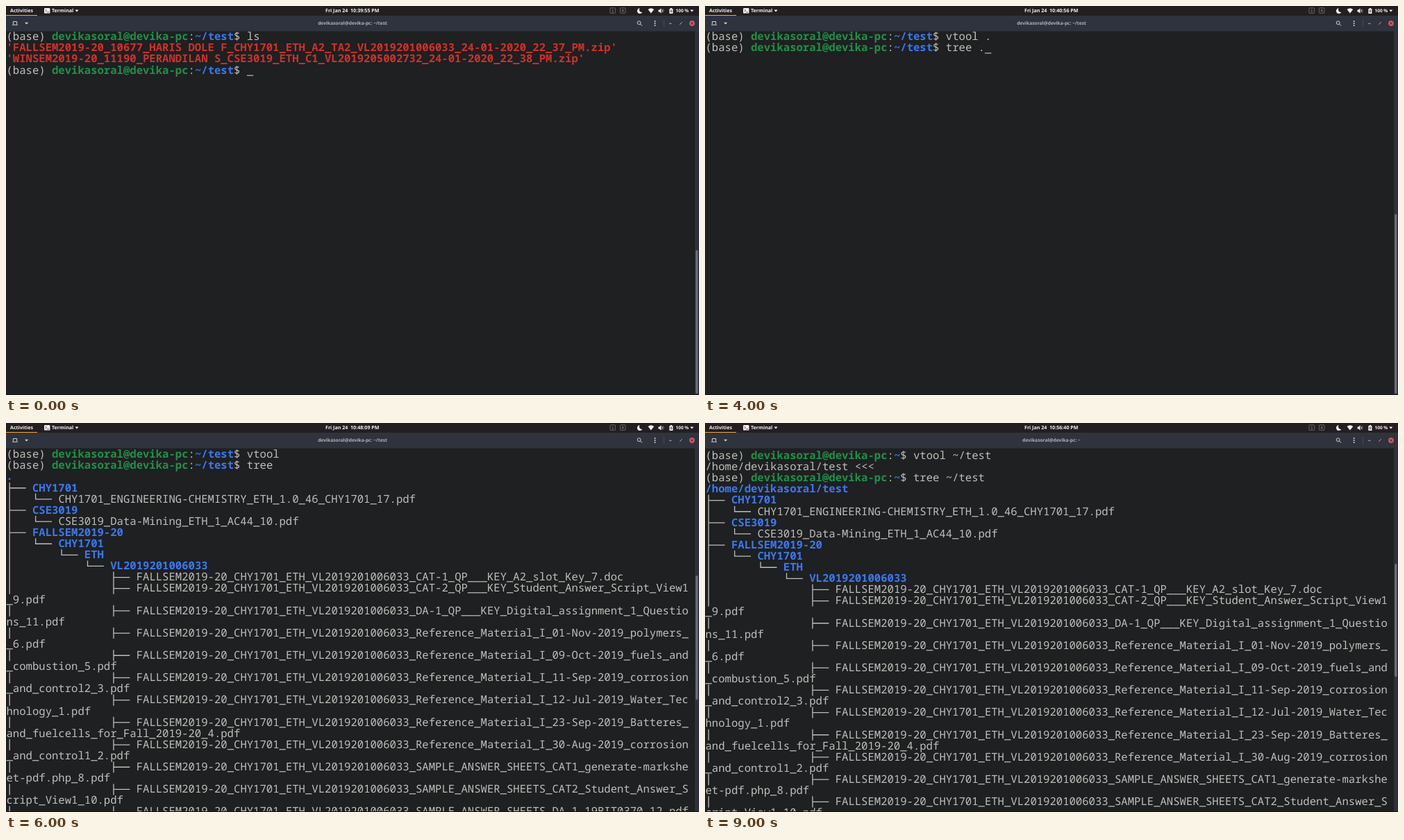
These frames come from a looping animation (998 by 561 pixels, 10000 ms). An HTML page:

```html
<!DOCTYPE html>
<html lang="en">
<head>
<meta charset="utf-8">
<title>Terminal session</title>
<style>
  html, body { margin: 0; width: 100%; height: 100%; overflow: hidden; background: #1e2021; }
  svg { display: block; width: 100%; height: 100%; }
  text { white-space: pre; text-rendering: geometricPrecision; }
  #screen text { font: 15.6px "Noto Sans Mono", "DejaVu Sans Mono", monospace; fill: #bfbfbc; }
  #screen .g { fill: #21904a; font-weight: 700; }
  #screen .b { fill: #3b78f0; font-weight: 700; }
  #screen .r { fill: #d0312b; font-weight: 700; }
  #screen path { fill: none; stroke: #bfbfbc; stroke-width: 1.3; }
  #screen rect { fill: #bfbfbc; }
  .bar { font: 700 7.1px "Noto Sans", "Open Sans", sans-serif; fill: #f2f2f2; }
  #title { font-size: 6.7px; fill: #aeb2ba; text-anchor: middle; }
  .line { fill: none; stroke: #d3d6db; stroke-width: 1; }
  .dim { fill: none; stroke: #77757a; stroke-width: .8; }
</style>
</head>
<body>
<svg viewBox="0 0 998 561">
  <defs><clipPath id="view"><rect y="36" width="992" height="524.5"/></clipPath></defs>
  <rect width="998" height="561" fill="#1e2021"/>
  <g id="screen" clip-path="url(#view)"></g>

  <rect x="992" y="36" width="6" height="525" fill="#2d313b"/>
  <rect id="thumb" x="993.2" width="3.2" rx="1.6" fill="#6a7080"/>
  <rect y="560" width="998" height="1" fill="#15161a"/>

  <rect width="998" height="14" fill="#231f20"/>
  <rect y="13" width="45" height="1.2" fill="#f0a630"/>
  <g class="bar">
    <text x="6" y="9.4">Activities</text>
    <text x="66" y="9.4">Terminal</text>
    <text id="clock" x="460" y="9.4"></text>
    <text x="964.5" y="9.3" font-size="6.5" style="font-size:6.5px">100 %</text>
    <rect x="55" y="3" width="8.4" height="7.6" rx="1.2"/>
    <path d="M99.5 5.6h5l-2.5 3zM985.3 5.6h5l-2.5 3z"/>
    <path d="M912.6 3a4 4 0 1 0 3.8 6a3.8 3.8 0 0 1-3.8-6z"/>
    <path d="M924.6 5q4.3-3.4 8.6 0l-4.3 5.6z"/>
    <path d="M939.5 5.4h1.6l2.4-2.2v7.4l-2.4-2.2h-1.6z"/>
    <path d="M955.4 4h1.4v-1h2.2v1h1.4v7h-5z"/>
  </g>
  <path d="M56.8 5l1.6 1.6l-1.6 1.6M59.3 8.8h2.4" fill="none" stroke="#231f20" stroke-width=".9"/>
  <path d="M958.4 5l-1.3 2.4h1.7l-1.3 2.4" fill="none" stroke="#231f20" stroke-width=".8"/>
  <path d="M944.8 5q1.5 1.9 0 3.8" class="line" stroke-width=".8"/>
  <path d="M946.2 4q2.2 2.9 0 5.8" class="dim"/>
  <rect x="870" y="2.8" width="7.6" height="7.6" rx="1" class="dim"/>
  <rect x="884.4" y="2.8" width="7.6" height="7.6" rx="1" class="dim"/>
  <path d="M873 5.4l.9-.6v3.6M872.8 8.4h2.2M886.7 8.6l1.5-4l1.5 4M887.2 7.3h2" class="dim"/>

  <rect y="14" width="998" height="22.5" fill="#2f333e"/>
  <text id="title" class="bar" x="499" y="27.2"></text>
  <path d="M10.4 26.4v-3.9h5.2v3.9M9 27.2h8" class="line"/>
  <path d="M27 23.8h5.2l-2.6 2.8z" fill="#d3d6db"/>
  <circle cx="911.7" cy="24.2" r="2.4" class="line"/>
  <path d="M913.5 26l2.6 2.6" class="line" stroke-width="1.3"/>
  <g fill="#d3d6db">
    <circle cx="934.6" cy="22" r="1"/><circle cx="934.6" cy="25" r="1"/><circle cx="934.6" cy="28" r="1"/>
  </g>
  <path d="M947.5 20v10" stroke="#464b57"/>
  <path d="M955 25.3h3.6M970.3 26.8l3.4-3.6" class="line" style="stroke:#a9adb5"/>
  <circle cx="988" cy="25" r="3.9" fill="#cc575d"/>
  <path d="M986.5 23.5l3 3m0-3l-3 3" stroke="#2f333e" stroke-width=".9"/>
</svg>
<script>
const COLS = 105, CELL = 9.36, ROW = 16.1, LEFT = 0.5, TOP = 36.4;
const USER = "devikasoral", HOST = USER + "@devika-pc", HOME = "/home/" + USER;
const $ = id => document.getElementById(id);

function el(parent, tag, attrs, text) {
  const node = document.createElementNS("http://www.w3.org/2000/svg", tag);
  for (const k in attrs) node.setAttribute(k, attrs[k]);
  if (text) node.textContent = text;
  parent.append(node);
  return node;
}

// A line is a list of [style, text] runs.
const plain = s => [["", s]];
const prompt = (dir, cmd = "") =>
  [["", "(base) "], ["g", HOST], ["", ":"], ["b", dir], ["", "$ " + cmd]];
const inTest = cmd => prompt("~/test", cmd);
const atHome = cmd => prompt("~", cmd);

const COURSE = "FALLSEM2019-20_CHY1701_ETH_VL2019201006033_";
const REF = "Reference_Material_I_", SHEETS = "SAMPLE_ANSWER_SHEETS_", KEY = "_QP___KEY_";
const files = {
  water: REF + "12-Jul-2019_Water_Technology_1.pdf",
  rust1: REF + "30-Aug-2019_corrosion_and_control1_2.pdf",
  rust2: REF + "11-Sep-2019_corrosion_and_control2_3.pdf",
  cells: REF + "23-Sep-2019_Batteres_and_fuelcells_for_Fall_2019-20_4.pdf",
  fuels: REF + "09-Oct-2019_fuels_and_combustion_5.pdf",
  poly: REF + "01-Nov-2019_polymers__6.pdf",
  cat1: "CAT-1" + KEY + "A2_slot_Key_7.doc",
  marks1: SHEETS + "CAT1_generate-marksheet-pdf.php_8.pdf",
  cat2: "CAT-2" + KEY + "Student_Answer_Script_View1_9.pdf",
  marks2: SHEETS + "CAT2_Student_Answer_Script_View1_10.pdf",
  da1: "DA-1" + KEY + "Digital_assignment_1_Questions_11.pdf",
  marks3: SHEETS + "DA-1_19BIT0370_12.pdf",
  da2: "DA-2/QUIZ-1" + KEY + "Title_of_DA_2_13.pdf",
  marks4: SHEETS + "DA-2/QUIZ-1_19BIT0397_14.pdf",
  da3: "DA-3/QUIZ-2" + KEY + "QuizStar_Quiz_Report_15.pdf"
};

const fallZip = "FALLSEM2019-20_10677_HARIS DOLE F_CHY1701_ETH_A2_TA2_VL2019201006033_24-01-2020_22_37_PM.zip";
const winZip = "WINSEM2019-20_11190_PERANDILAN S_CSE3019_ETH_C1_VL2019205002732_24-01-2020_22_38_PM.zip";
const listing = [inTest("ls"), ...[fallZip, winZip].map(f => [["r", `'${f}'`]])];

const unzip = [
  inTest("unzip '*.zip'"),
  plain("Archive:  " + fallZip),
  ...Object.values(files).map(f => plain(`  inflating: ${COURSE}${f}  `))
];

const dir = (lead, name) => [["", lead], ["b", name]];
const treeOrder = "cat1 cat2 da1 poly fuels rust2 water cells rust1 marks1 marks2 marks3".split(" ");
const tree = root => [
  [["b", root]],
  dir("├── ", "CHY1701"),
  plain("│   └── CHY1701_ENGINEERING-CHEMISTRY_ETH_1.0_46_CHY1701_17.pdf"),
  dir("├── ", "CSE3019"),
  plain("│   └── CSE3019_Data-Mining_ETH_1_AC44_10.pdf"),
  dir("├── ", "FALLSEM2019-20"),
  dir("│   └── ", "CHY1701"),
  dir("│       └── ", "ETH"),
  dir("│           └── ", "VL2019201006033"),
  ...treeOrder.map(k => plain("│" + " ".repeat(15) + "├── " + COURSE + files[k]))
];

const vtoolHome = [atHome("vtool ~/test"), plain(HOME + "/test <<<")];

// One scene per second; a cursor follows the last line unless it is off screen.
const scene = (clock, lines, { top = TOP, thumb = [300, 559], cwd = "~/test", cursor = true } = {}) =>
  ({ clock, lines, top, thumb, cwd, cursor });
const scenes = [
  scene("10:39:55", [...listing, inTest()], { thumb: [352, 559] }),
  scene("10:40:18", [...listing, ...unzip], { top: 46, thumb: [270, 424], cursor: false }),
  scene("10:40:43", [inTest("vtool .")]),
  scene("10:40:48", [inTest("vtool ."), inTest()]),
  scene("10:40:56", [inTest("vtool ."), inTest("tree .")]),
  scene("10:41:01", [inTest("vtool ."), inTest("tree ."), ...tree(".")],
    { top: 39, thumb: [205, 370], cursor: false }),
  scene("10:48:09", [inTest("vtool"), inTest("tree"), ...tree(".")],
    { top: 37.4, thumb: [220, 399], cursor: false }),
  scene("10:56:17", [atHome("vtool ~/test")], { cwd: "~" }),
  scene("10:56:24", [...vtoolHome, atHome()], { cwd: "~" }),
  scene("10:56:40", [...vtoolHome, atHome("tree ~/test"), ...tree(HOME + "/test")],
    { top: 39.2, thumb: [203, 366], cwd: "~", cursor: false })
];

// Box-drawing characters as strokes that fill the whole cell.
const half = CELL / 2, mid = ROW / 2;
const strokes = {
  "│": `v${ROW}`,
  "├": `v${ROW}m0 ${-mid}h${half}`,
  "└": `v${mid}h${half}`,
  "─": `m${-half} ${mid}h${CELL}`
};

function build(s) {
  const g = el($("screen"), "g", { display: "none" });
  let row = 0, col = 0, d = "";
  const x = c => LEFT + c * CELL, y = () => s.top + row * ROW;
  s.lines.forEach((line, i) => {
    if (i) { row++; col = 0; }
    for (let [style, str] of line) {
      while (str) {
        if (col === COLS) { row++; col = 0; }
        const part = str.slice(0, COLS - col);
        str = str.slice(part.length);
        [...part].forEach((ch, k) => {
          if (strokes[ch]) d += `M${x(col + k) + half} ${y()}${strokes[ch]}`;
        });
        const shown = part.replace(/[│├└─]/g, " ");
        const skip = shown.length - shown.trimStart().length;
        if (shown.trim())
          el(g, "text", { x: x(col + skip), y: y() + 12.8, class: style }, shown.trim());
        col += part.length;
      }
    }
  });
  if (d) el(g, "path", { d });
  if (s.cursor) el(g, "rect", { x: x(col), y: y() + 14.9, width: CELL, height: 1.2 });
  return g;
}

const groups = scenes.map(build);
let current = -1;

function show(n) {
  if (n === current) return;
  current = n;
  const s = scenes[n];
  groups.forEach((g, i) => g.setAttribute("display", i === n ? "inline" : "none"));
  $("clock").textContent = `Fri Jan 24  ${s.clock} PM`;
  $("title").textContent = `${HOST}: ${s.cwd}`;
  $("thumb").setAttribute("y", s.thumb[0]);
  $("thumb").setAttribute("height", s.thumb[1] - s.thumb[0]);
}

const start = performance.now();
function tick() {
  show(Math.floor((performance.now() - start) / 1000) % scenes.length);
  requestAnimationFrame(tick);
}
tick();
</script>
</body>
</html>
```
